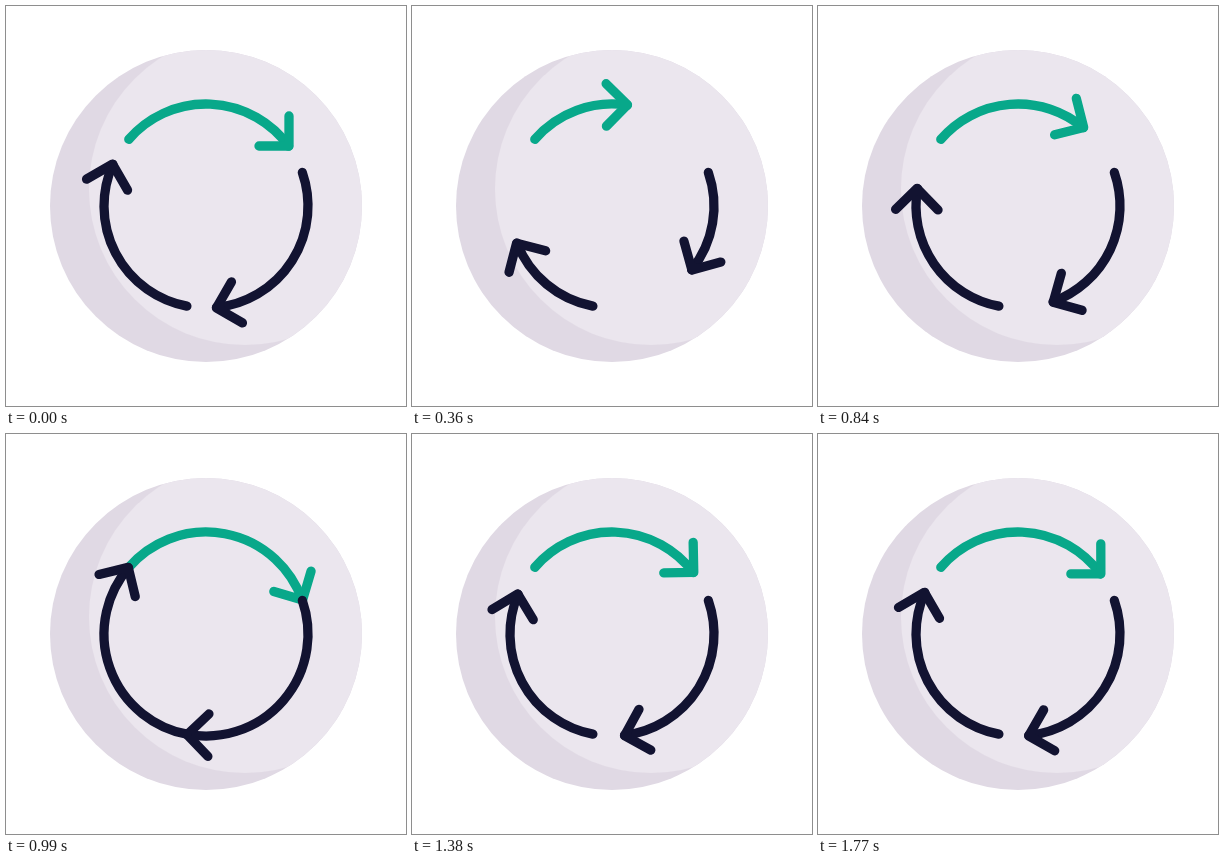
Animation, 400 px wide and 400 px high, one loop 1830 ms. Source, as an HTML page:

```html
<!DOCTYPE html>
<html lang="en">
<head>
<meta charset="utf-8">
<title>Cycle arrows</title>
<style>
  html, body { margin: 0; width: 100%; height: 100%; overflow: hidden; background: #fff; }
  svg { display: block; width: 100%; height: 100%; }
</style>
</head>
<body>
<svg viewBox="0 0 400 400">
  <defs>
    <clipPath id="disc"><circle cx="200" cy="200" r="156"/></clipPath>
  </defs>
  <circle cx="200" cy="200" r="156" fill="#e0d9e4"/>
  <circle cx="239" cy="183" r="156" fill="#ebe6ee" clip-path="url(#disc)"/>
  <g id="arrows" fill="none" stroke-width="9.3" stroke-linecap="round" stroke-linejoin="round"></g>
</svg>
<script>
const LOOP = 1830, STEP = 30, LAST = 60;
const CENTER = 200, RADIUS = 102;
const START = -139.2, REST = -35.9;  // arc ends in degrees
const PULL = -50;                    // furthest retreat from rest
const TURN = 15, RELEASE = 30;       // key positions, 30 per second

const group = document.getElementById('arrows');
const arrows = ['#08a88a', '#121331', '#121331'].map((color, i) => {
  const g = add(group, 'g', { stroke: color, transform: `rotate(${i * 120} 200 200)` });
  return { arc: add(g, 'path', {}), head: add(g, 'path', { d: 'M253 140H283V110' }) };
});

function add(parent, tag, attrs) {
  const el = document.createElementNS('http://www.w3.org/2000/svg', tag);
  for (const key in attrs) el.setAttribute(key, attrs[key]);
  return parent.appendChild(el);
}

function bezier(x1, y1, x2, y2) {
  const at = (a, b, t) => 3 * (1 - t) ** 2 * t * a + 3 * (1 - t) * t * t * b + t ** 3;
  return x => {
    let lo = 0, hi = 1;
    for (let i = 0; i < 24; i++) {
      const mid = (lo + hi) / 2;
      if (at(x1, x2, mid) < x) lo = mid; else hi = mid;
    }
    return at(y1, y2, (lo + hi) / 2);
  };
}

const retreat = bezier(0.333, 0, 0.63, 1);
const advance = bezier(0.4, 0, 0.55, 0);

// Degrees away from rest: pull back, shoot forward, then ring out.
function offset(n) {
  if (n <= TURN) return PULL * retreat(n / TURN);
  if (n <= RELEASE) return PULL * (1 - advance((n - TURN) / (RELEASE - TURN)));
  const s = (n - RELEASE) / 30;
  return 28.5 * Math.sin(6 * Math.PI * s) * Math.exp(-5 * s);
}

function point(deg) {
  const a = deg * Math.PI / 180;
  return `${(CENTER + RADIUS * Math.cos(a)).toFixed(2)} ${(CENTER + RADIUS * Math.sin(a)).toFixed(2)}`;
}

function render(ms) {
  const turn = offset(Math.min(LAST, Math.floor((ms % LOOP) / STEP)));
  const arc = `M${point(START)}A${RADIUS} ${RADIUS} 0 0 1 ${point(REST + turn)}`;
  for (const arrow of arrows) {
    arrow.arc.setAttribute('d', arc);
    arrow.head.setAttribute('transform', `rotate(${turn.toFixed(3)} 200 200)`);
  }
}

const begin = performance.now();
function tick() {
  render(performance.now() - begin);
  requestAnimationFrame(tick);
}
tick();
</script>
</body>
</html>
```
